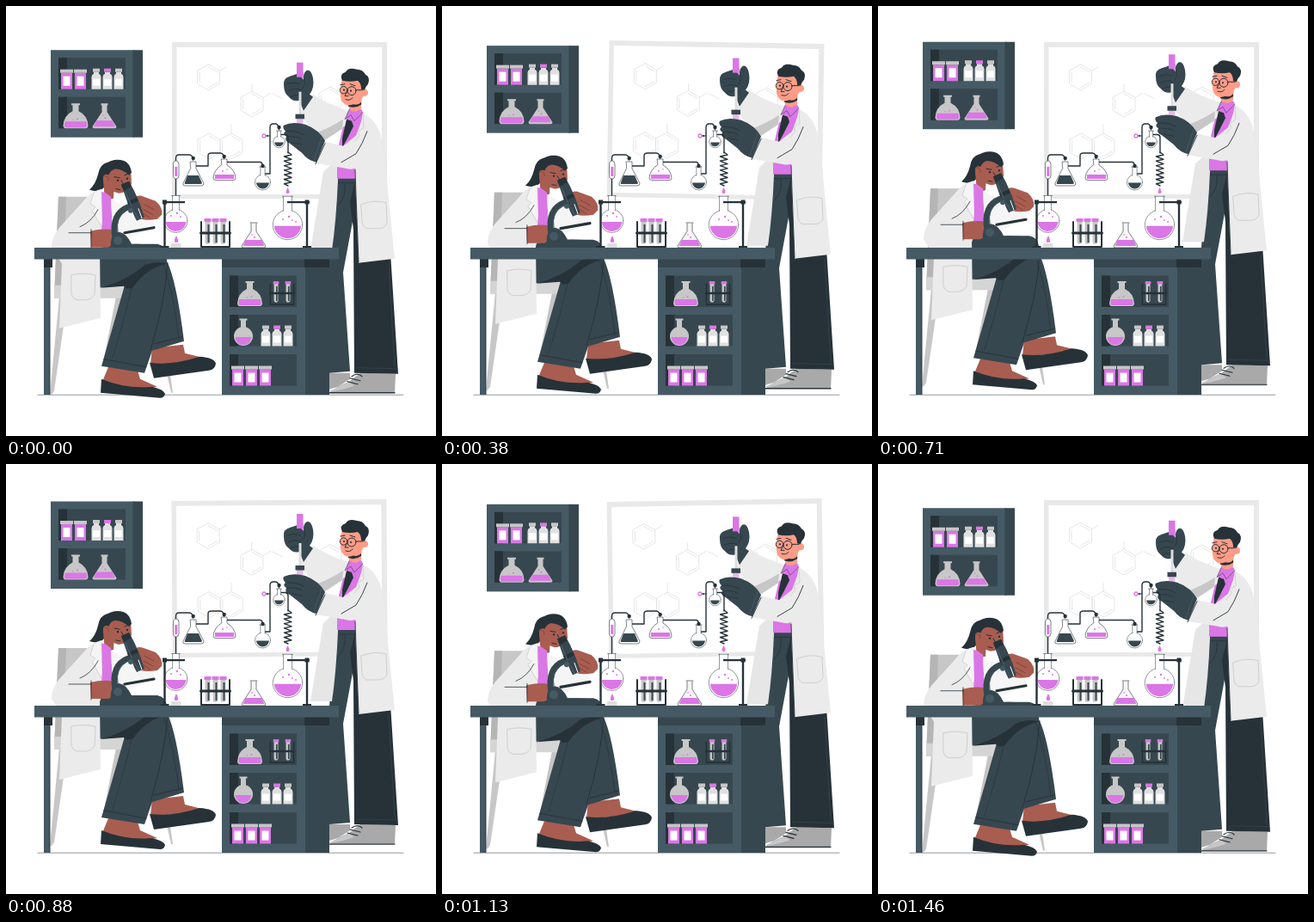
Recreate the animation shown at these times as an HTML page with a canvas. Size 500 by 500 pixels, loop 1.5 s.

```html
<!DOCTYPE html>
<html lang="en">
<head>
<meta charset="utf-8">
<title>Laboratory</title>
<style>
html, body { margin: 0; width: 100%; height: 100%; overflow: hidden; background: #fff; }
canvas { display: block; width: 100vw; height: 100vh; }
</style>
</head>
<body>
<canvas id="stage"></canvas>
<script>
const canvas = document.getElementById('stage');
const ctx = canvas.getContext('2d');
const LOOP = 1500, PHASE = 20;
const INK = '#263238', SLATE = '#37474f', STEEL = '#455a64', PURPLE = '#db76e6';
const COAT = '#ebebeb', GREY = '#c7c7c7', MID = '#a9a9a9', WHITE = '#fff';
const BROWN = '#a85d50', PEACH = '#ff9c87';

const paths = new Map();
function path(d) {
  if (!paths.has(d)) paths.set(d, new Path2D(d));
  return paths.get(d);
}
function fill(color, d) {
  ctx.fillStyle = color;
  ctx.fill(path(d));
}
function line(color, width, d) {
  ctx.strokeStyle = color;
  ctx.lineWidth = width;
  ctx.stroke(path(d));
}
function rect(color, x, y, w, h) {
  ctx.fillStyle = color;
  ctx.fillRect(x, y, w, h);
}
function dot(color, x, y, r) {
  ctx.fillStyle = color;
  ctx.beginPath();
  ctx.arc(x, y, r, 0, Math.PI * 2);
  ctx.fill();
}
function ring(color, width, x, y, r) {
  ctx.strokeStyle = color;
  ctx.lineWidth = width;
  ctx.beginPath();
  ctx.arc(x, y, r, 0, Math.PI * 2);
  ctx.stroke();
}
function at(x, y, draw) {
  ctx.save();
  ctx.translate(x, y);
  draw();
  ctx.restore();
}

// Glassware; the origin is the middle of the foot.
function jar(x, y) {
  at(x, y, () => {
    rect(PURPLE, -6.5, -19, 13, 19);
    rect(GREY, -7.5, -23, 15, 4);
    rect(WHITE, -4, -15, 8, 11);
  });
}
function bottle(x, y, cap = GREY) {
  at(x, y, () => {
    fill('#e0e0e0', 'M-3,-20H3V-18Q5.5,-17 5.5,-14V0H-5.5V-14Q-5.5,-17 -3,-18Z');
    rect(cap, -4, -24, 8, 4);
    rect(WHITE, -4, -12, 8, 8);
  });
}
function domeFlask(x, y) {
  at(x, y, () => {
    fill(GREY, 'M-5,-29H5V-27H3.5V-20Q14,-15 14.5,-3Q14,0 12,0H-12Q-14,0 -14.5,-3Q-14,-15 -3.5,-20V-27H-5Z');
    fill(PURPLE, 'M-12.5,-8H12.5L13,-3Q13,-1 11,-1H-11Q-13,-1 -13,-3Z');
    dot(PURPLE, 2, -11, 1);
    dot(PURPLE, -3, -10, .7);
  });
}
function coneFlask(x, y, glass = GREY) {
  at(x, y, () => {
    fill(glass, 'M-4,-29H4V-27H3V-19L14,-2Q14,0 12,0H-12Q-14,0 -14,-2L-3,-19V-27H-4Z');
    fill(PURPLE, 'M-9,-9H9L12.5,-2H-12.5Z');
    dot(PURPLE, 1, -12, 1);
    dot(PURPLE, -2, -15, .8);
  });
}
function tubeRack(x, y, s, tubes) {
  at(x, y, () => {
    ctx.scale(s, s);
    for (const tx of tubes) {
      fill(GREY, `M${tx - 3},-32H${tx + 3}V-7Q${tx + 3},-4 ${tx},-4Q${tx - 3},-4 ${tx - 3},-7Z`);
      rect(SLATE, tx, -27, 2, 21);
      rect(PURPLE, tx - 4, -34, 8, 4);
    }
    line(INK, 2, 'M-16.5,-30V-1H16.5V-30');
    line(INK, 3, 'M-17,-17H17');
  });
}
function roundFlask(x, y, r, neck, liquid) {
  const n = r * .29, top = y - r - neck;
  rect(WHITE, x - n, top, n * 2, neck + 4);
  dot(WHITE, x, y, r);
  ctx.fillStyle = liquid;
  ctx.beginPath();
  ctx.arc(x, y, r - 1.5, .08, Math.PI - .08);
  ctx.fill();
  ring(INK, .5, x, y, r);
  rect(WHITE, x - n, y - r - 1, n * 2, 3);
  ctx.beginPath();
  for (const s of [-n, n]) {
    ctx.moveTo(x + s, top);
    ctx.lineTo(x + s, y - r + 1);
  }
  ctx.moveTo(x - n - 1, top);
  ctx.lineTo(x + n + 1, top);
  ctx.stroke();
}
function bubbles(x, y) {
  dot(PURPLE, x - 5, y - 4, 1);
  dot(PURPLE, x + 2, y - 7, 1.2);
  dot(PURPLE, x + 6, y - 3, .9);
}

function niche(x, y) {
  rect(SLATE, x, y, 78, 36.5);
  rect(INK, x, y, 10, 36.5);
}
function shelf() {
  rect(STEEL, 52, 51.5, 97, 101.5);
  rect(SLATE, 147.5, 51.5, 11.5, 101.5);
  niche(61, 60.5);
  niche(61, 106);
  jar(70.5, 97);
  jar(86.5, 97);
  bottle(105, 97);
  bottle(118, 97, PURPLE);
  bottle(131, 97);
  domeFlask(81, 142.5);
  coneFlask(114.5, 142.5);
}

function hexagon(x, y) {
  const r = 15;
  ctx.strokeStyle = '#e0e0e0';
  ctx.lineWidth = .8;
  ctx.beginPath();
  for (let i = 0; i < 6; i++) {
    const a = (i / 3 - .5) * Math.PI;
    ctx.lineTo(x + r * Math.cos(a), y + r * Math.sin(a));
  }
  ctx.closePath();
  for (const i of [0, 2, 4]) {
    const a = (i / 3 - .5) * Math.PI, b = a + Math.PI / 3;
    ctx.moveTo(x + 12 * Math.cos(a), y + 12 * Math.sin(a));
    ctx.lineTo(x + 12 * Math.cos(b), y + 12 * Math.sin(b));
  }
  ctx.stroke();
}
function board() {
  rect('#e9e9e9', 193, 42, 250, 182);
  rect(WHITE, 198.5, 48, 238.5, 171);
  hexagon(235.5, 83);
  hexagon(286, 114);
  hexagon(236, 163);
  hexagon(262, 163);
  hexagon(377, 109);
  line('#e0e0e0', .8, 'M248.5,75.5L256,71M286,99V91M299,106.5L308,101M310,102L322,108M262,148V138');
}

function man() {
  // Shoes and trousers
  fill(MID, 'M376,427H400V434L386,443L376,446Z');
  fill(MID, 'M376,450Q384,443 399,437L412,427L453,428L452,451H376Z');
  fill(GREY, 'M376,448Q386,444 399,437L405,442Q390,447 377,449Z');
  line(INK, 1.2, 'M400,433L412,436M397,437L409,440M402,431Q409,426 414,431M376,450H452');
  fill(SLATE, 'M383,200H407L405,240L392,310L400,425L376,427V290Z');
  fill(INK, 'M407,200L400,228L404,260L405,427L456,428L444,240Z');
  line(SLATE, .7, 'M445,300L452,420M408,421L455,422');
  line(INK, .8, 'M384,206H407M394,207Q396,222 386,232');

  // Coat back flap, shirt and tie
  fill('#e6e6e6', 'M386,178L369,193L354,284H379Q384,250 386,202Z');
  fill(PURPLE, 'M396,123L414,121L418,150L408,201H385V170Z');
  fill(INK, 'M396,132L402,134L404,140L397,154L391,165L391,154Z');

  // Far arm
  fill(COAT, 'M357,103Q372,114 398,122L394,140L367,151Q352,143 341,124Z');
  fill(GREY, 'M355,150Q375,143 392,132L391,143L365,160Z');

  // Coat front and near arm
  fill(COAT, 'M415,125Q430,132 436,151Q442,180 444,215L452,294L410,299L406,200L407,165Z');
  fill(COAT, 'M416,127Q429,130 428,148L414,180Q409,193 395,189L360,183L371,158L392,163L407,151Z');
  line(INK, .9, 'M420,146Q415,160 407,172L390,182M371,160L360,184M406,191L407,220L410,298');
  line(GREY, .7, 'M415,126L416,142L409,146L411,151L405,158');
  line(GREY, .8, 'M413,231Q428,225 442,229L443,253Q440,259 433,259H419Q414,256 414,251Z');
  fill(PURPLE, 'M400,118L394,132L401,127L405,134L415,124L412,119Z');
  line(INK, .5, 'M400,119L394,132L401,127L405,134L415,124');

  // Head
  fill(PEACH, 'M399,107L414,102L413,119Q406,126 399,120Z');
  fill(INK, 'M398,112Q408,118 413,112V115Q406,120 398,117Z');
  fill(PEACH, 'M391,84Q387,101 390,110Q395,119 405,114Q414,111 417,102L416,87Q404,78 391,84Z');
  dot(PEACH, 417, 101, 4);
  fill(INK, 'M391,87Q387,79 395,77Q398,71 408,74Q415,74 418,80Q424,83 421,91Q418,94 417,98L413,97Q413,90 409,87Q400,89 391,87Z');
  ring(INK, 1, 402, 99, 5);
  ring(INK, 1, 392.5, 98, 4.2);
  line(INK, 1, 'M407,98L415,98M389,92L394,91M400,91L406,93M395,109Q400,111 403,107M397,99L394,105L398,105');
  dot(INK, 393, 98, 1.1);
  dot(INK, 401, 99, 1.1);

  // Pipette and gloves
  rect(PURPLE, 338, 66, 7.5, 22);
  rect('#e4bce8', 338, 131, 7.5, 24);
  fill(SLATE, 'M323,92Q322,84 330,82L339,79L346,86Q345,78 350,75Q355,74 357,84Q359,95 353,103L357,106L346,122L341,110Q334,112 329,106Q323,102 323,92Z');
  line(INK, .8, 'M327,91Q336,88 342,91M328,99Q336,95 343,98M331,106Q338,102 344,105M347,86Q349,91 345,96');
  rect(PURPLE, 338, 78, 7.5, 5);
  rect('#dedede', 340.5, 100, 3, 27);
  rect(SLATE, 336.5, 126, 10.5, 5.5);
  fill(SLATE, 'M323,139Q333,134 348,138Q364,144 371,157L361,182Q351,180 344,171L330,160Q323,157 326,152Q321,149 325,146Q321,142 323,139Z');
  line(INK, .8, 'M326,146Q338,145 346,150M327,152Q337,151 344,155M332,159L344,161');
  line(STEEL, 1, 'M367,154L358,179');
}

function chair() {
  fill(GREY, 'M61,222H96L92,340H56Z');
  fill('#b5b5b5', 'M61,222H70L66,338H56Z');
  fill('#c4c4c4', 'M128,338H139L122,397L112,420Z');
  fill(GREY, 'M62,338H74L67,372L56,448L53,452H51Z');
  fill(GREY, 'M184,415H189L194,450H192Z');
  fill('#d5d5d5', 'M56,325H140V335Q139,340 133,340H56Z');
}

function woman() {
  chair();
  // Feet
  fill(BROWN, 'M170,398L206,394L208,404L228,409Q218,416 168,416Z');
  fill(INK, 'M167,415Q195,418 225,408Q242,409 244,416Q243,423 236,424L172,433Z');
  fill(BROWN, 'M119,420L153,424L156,434L176,443Q146,449 112,437Z');
  fill(INK, 'M111,434Q140,446 170,443Q183,446 185,451Q184,456 179,456L110,450Z');

  // Trousers
  fill(SLATE, 'M105,300L110,281Q148,274 180,279Q188,282 187,297Q198,318 207,390L170,401L161,427L111,419L138,325L105,328Z');
  fill(INK, 'M110,328Q140,320 162,301Q178,296 188,300Q164,304 147,328L140,329L137,326Z');
  line(INK, .9, 'M188,299Q185,345 168,400M114,411L163,420M172,393L205,385');
  line(INK, .6, 'M147,324Q139,360 124,409M183,300Q196,340 201,387');

  // Hair behind, neck and shirt
  fill(INK, 'M118,182Q109,184 107,196Q104,208 97,214Q108,218 114,211L124,214L128,189Z');
  fill(BROWN, 'M113,203H126L125,224L115,226Z');
  fill(PURPLE, 'M109,216L115,217L122,222L124,263L108,268Z');

  // Far arm and sleeve
  fill('#f5f5f5', 'M122,225Q137,232 149,239L172,244L172,257L145,270L124,261Z');
  fill(BROWN, 'M148,224Q153,219 160,222L174,227Q183,235 181,243L176,248Q164,250 157,248Z');
  line('#773d36', .8, 'M161,231L172,237M160,237L171,243M160,242L168,247');

  // Coat
  fill(COAT, 'M111,213Q98,216 91,226L62,258Q53,269 53,281L65,300L62,375L110,363L109,282L112,250Z');
  fill('#f5f5f5', 'M110,214L102,218L98,230L104,234L100,238L111,256Z');
  line(GREY, .8, 'M76,313Q90,310 104,313L103,336Q99,342 93,342H83Q76,340 76,334Z');
  line(GREY, .7, 'M102,218L98,230L104,234L100,238L111,257');
  fill(BROWN, 'M98,262Q111,259 121,260L130,264L127,276L119,281H99Z');
  line(INK, .8, 'M73,264L99,264M99,260V282M86,257Q99,252 107,237');

  // Head
  fill(BROWN, 'M113,192Q118,182 133,184L145,190L146,207Q140,218 131,218Q118,215 113,204Z');
  fill(INK, 'M111,197Q113,179 130,179Q144,179 146,194L143,197Q134,189 126,190Q119,192 118,203Z');
  dot(BROWN, 117, 200, 4);
  line('#773d36', .7, 'M115,198Q119,197 119,203');
  line(INK, 1, 'M126,199L132,200M138,197L143,195M134,203L138,210L135,211M128,213L133,214');
  dot(INK, 130, 203, 1.2);
  dot(INK, 141, 201, 1.2);

  // Microscope
  line(SLATE, 7, 'M142,234Q122,242 127,270');
  line(STEEL, 1, 'M140,238Q127,245 130,263');
  fill(SLATE, 'M122,284Q120,265 131,263Q140,264 146,277H176Q186,279 187,290H122Z');
  dot(STEEL, 130, 273, 5);
  line(INK, 3.2, 'M138,264L172,258');
  fill(SLATE, 'M134,208L143,204L149,215L156,231L161,246L152,250L142,231Z');
  fill(INK, 'M134,208L143,204L146,210L137,215ZM141,228L152,223L154,227L143,232Z');
  line(STEEL, 1.5, 'M139,217L146,233M150,240L154,248');
  line(WHITE, 1, 'M147,240L150,250M154,236L158,247');
  dot(STEEL, 145, 238, 3);
}

function desk() {
  rect(STEEL, 44, 294, 6.5, 158);
  rect(SLATE, 50, 294, 1.5, 158);
  rect(INK, 44, 294, 10, 10);
  rect(SLATE, 347, 294, 29, 158);
  rect(STEEL, 251, 294, 97, 158);
  rect(SLATE, 251, 294, 97, 10);
  rect(INK, 347, 294, 29, 10);
  for (const y of [313.5, 359, 405]) niche(260, y);
  domeFlask(283.5, 349);
  tubeRack(321, 348, .82, [-8.5, 8.5]);
  dot(GREY, 276, 384, 11);
  rect(GREY, 273, 364, 6, 12);
  rect(GREY, 271.5, 363.5, 9, 2);
  fill(PURPLE, 'M266.5,385H285.5Q284,394 276,394Q268,394 266.5,385Z');
  bottle(302, 395.5);
  bottle(315, 395.5, PURPLE);
  bottle(328, 395.5);
  for (const x of [269.5, 285.5, 301.5]) jar(x, 441.5);
  rect(STEEL, 33, 281, 354, 13.5);
}

function stand(x, clampFrom, clampTo) {
  rect(INK, x - 1.2, 226, 2.4, 55);
  rect(INK, x - 5, 279, 10, 2);
  rect(INK, clampFrom, 227, clampTo - clampFrom, 2.2);
  rect(INK, x - 2.5, 225.5, 5, 5);
}
function apparatus() {
  // Tubing
  line(INK, 1.4, 'M197.5,222V177Q197.5,173 201,173H213Q217,173 217.5,179');
  line(INK, 1.4, 'M221,186H235V174Q235,171 239,171H249Q253,171 253.5,177');
  line(INK, 1.4, 'M257,181.5H296Q298.5,182 298.5,188M301,195H307V141Q307,137 311,137H314Q317,138 317.5,144');
  line(INK, 1.4, 'M320,149.5H325Q328,150 328,153V171');
  let coil = 'M328,170';
  for (let y = 172; y < 206; y += 5.3) coil += `L332,${y + 1}L323.5,${y + 3}`;
  line(INK, 1.4, coil + 'L328,209');
  line(INK, 1, 'M302,151H307');
  ring(PURPLE, 1.3, 300, 151, 2);
  dot(INK, 304, 151, 1);

  // Small vessels
  const vial = 'M194.5,184Q194.5,180 197.7,180Q201,180 201,184V197Q201,201 197.7,201Q194.5,201 194.5,197Z';
  fill(WHITE, vial);
  line(INK, .6, vial);
  rect(PURPLE, 196.3, 187, 3, 11);

  const cone = 'M214.5,181H221V189L230,206Q230,209 227,209H208Q205,209 206,206L214.5,189Z';
  fill(WHITE, cone);
  fill(SLATE, 'M211,197H224L228,206Q228,207 226,207H209Q207,207 208,205Z');
  line(INK, .6, cone);

  const dome = 'M250.5,178H257V185Q266,190 267,200Q267,202.5 264,202.5H244Q241,202.5 241,200Q242,190 250.5,185Z';
  fill(WHITE, dome);
  fill(PURPLE, 'M243,196H265V201H243Z');
  line(INK, .6, dome);
  dot(PURPLE, 252, 192, 1);
  dot(PURPLE, 257, 190, .8);

  roundFlask(298.5, 205, 9, 9, SLATE);
  roundFlask(317.5, 158, 6.8, 6, SLATE);
  for (const [x, y] of [[217.7, 177], [253.7, 175], [298.5, 186], [317.5, 141]]) dot(INK, x, y, 2.2);
  fill(PURPLE, 'M327.5,211Q330,215 329.5,217Q327.5,219.5 325.7,217Q325.2,215 327.5,211Z');

  // Bench glassware
  roundFlask(197.5, 250, 13.5, 16, PURPLE);
  bubbles(197, 248);
  stand(184.5, 182, 208);
  fill(PURPLE, 'M198,267Q201,272 199.5,275H196.3Q195,272 198,267Z');
  rect('#dedede', 192, 276, 11.5, 5);
  tubeRack(243.5, 281, 1, [-9, 0, 9]);
  coneFlask(288, 281, '#f5f5f5');
  line(INK, .6, 'M284,252H292M285,253V262L274,279Q274,281 276,281H300Q302,281 302,279L291,262V253');
  roundFlask(327.5, 254.5, 17.2, 16, PURPLE);
  bubbles(327, 252);
  dot(PURPLE, 337, 251, 1);
  stand(350, 327, 353);
}

function render(now) {
  const ratio = window.devicePixelRatio || 1;
  const w = Math.round(innerWidth * ratio), h = Math.round(innerHeight * ratio);
  if (canvas.width !== w || canvas.height !== h) {
    canvas.width = w;
    canvas.height = h;
  }
  ctx.setTransform(w / 500, 0, 0, h / 500, 0, 0);
  ctx.lineJoin = ctx.lineCap = 'round';
  rect(WHITE, 0, 0, 500, 500);

  const p = ((now + PHASE) % LOOP) / LOOP;
  const lift = -10 * (1 - Math.abs(2 * p - 1));
  const tilt = p < .25 ? 4 * p : p < .75 ? 2 - 4 * p : 4 * p - 4;

  line(INK, .5, 'M37,452.2H462');
  at(318, 133, () => {
    ctx.rotate(tilt * Math.PI / 180);
    ctx.translate(-318, -133);
    board();
  });
  at(0, lift, shelf);
  at(0, lift, man);
  at(0, lift, woman);
  desk();
  apparatus();
}

function tick() {
  render(performance.now());
  requestAnimationFrame(tick);
}
tick();
</script>
</body>
</html>
```
